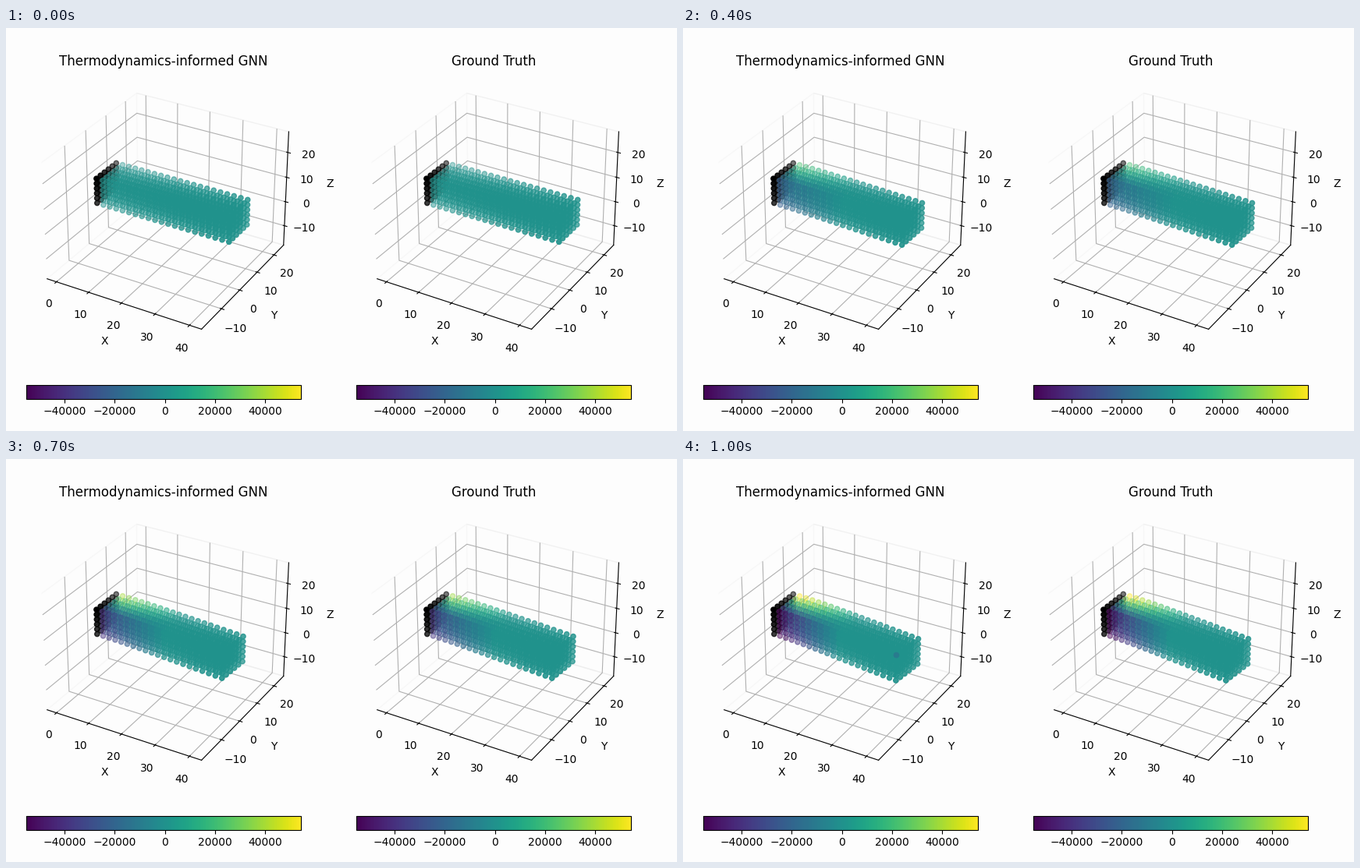
Animation of 860x517 px, one loop 1050 ms. Source, as a matplotlib script:

```python
import numpy as np
import matplotlib.pyplot as plt
from matplotlib.animation import FuncAnimation
from matplotlib.cm import ScalarMappable
from matplotlib.colors import Normalize

W, H, DPI = 860, 517, 100
FRAMES, INTERVAL = 21, 50
BG = "#fdfdfd"

SIDE = 352.3                    # edge of each square 3D panel, in pixels
SPAN = 40.5 * 1.1 * 25 / 24     # data range shown on every axis
CENTER = (20.25, 2.68, 5.0)
NORM = Normalize(-55300, 54400)

LENGTH, BEND = 40.0, 22.0       # beam length and extent of the bending zone
TILT, SHEAR = 0.1, 0.032        # final section rotation and shear angle
PEAK = 60500                    # final stress extrapolated to the clamp

X, Y, Z = (g.ravel() for g in np.meshgrid(
    np.linspace(0, LENGTH, 21), np.linspace(0, 10, 6), np.linspace(0, 10, 6),
    indexing="ij"))
fixed = X == 0
x, y, z = X[~fixed], Y[~fixed], Z[~fixed]
tip = (x == LENGTH) & (y == 0) & (z == 10)

rest = np.clip(1 - x / BEND, 0, 1)
rotation = TILT * (1 - rest**2)
sag = TILT * (x - BEND / 3 * (1 - rest**3)) + SHEAR * x
stress = PEAK * rest**1.15 * (y - 5) / 5


def px_rect(left, top, width, height):
    return [left / W, 1 - (top + height) / H, width / W, height / H]


def make_panel(left, title):
    ax = fig.add_axes(px_rect(left, 408.6 - SIDE, SIDE, SIDE),
                      projection="3d", facecolor=BG)
    ax.set_title(title)
    ax.set(xlabel="X", ylabel="Y", zlabel="Z")
    ax.set_xticks(range(0, 41, 10))
    ax.set_yticks(range(-10, 21, 10))
    ax.set_zticks(range(-10, 21, 10))
    limits = [(c - SPAN / 2, c + SPAN / 2) for c in CENTER]
    ax.set_xlim(limits[0])
    ax.set_ylim(limits[1])
    ax.set_zlim(limits[2])
    for axis in (ax.xaxis, ax.yaxis, ax.zaxis):
        axis.pane.fill = False
    ax.scatter(X[fixed], Y[fixed], Z[fixed], color="k")

    cax = fig.add_axes(px_rect(left, 458.2, SIDE, 17.4))
    fig.colorbar(ScalarMappable(NORM, "viridis"), cax=cax,
                 orientation="horizontal",
                 ticks=range(-40000, 40001, 20000))
    return ax


fig = plt.figure(figsize=(W / DPI, H / DPI), dpi=DPI, facecolor=BG)
panels = [make_panel(26.1, "Thermodynamics-informed GNN"),
          make_panel(449.1, "Ground Truth")]
clouds = []


def draw(frame):
    t = frame / (FRAMES - 1)
    while clouds:
        clouds.pop().remove()
    truth = t * stress
    net = 1.04 * truth
    net[tip] = -10000 * np.clip((t - 0.75) / 0.15, 0, 1)
    for ax, values in zip(panels, (net, truth)):
        clouds.append(ax.scatter(
            x + t * (y - 5) * rotation, y - t * sag, z,
            c=values, cmap="viridis", norm=NORM))
    return clouds


anim = FuncAnimation(fig, draw, frames=FRAMES, interval=INTERVAL, repeat=True)
plt.show()
```
